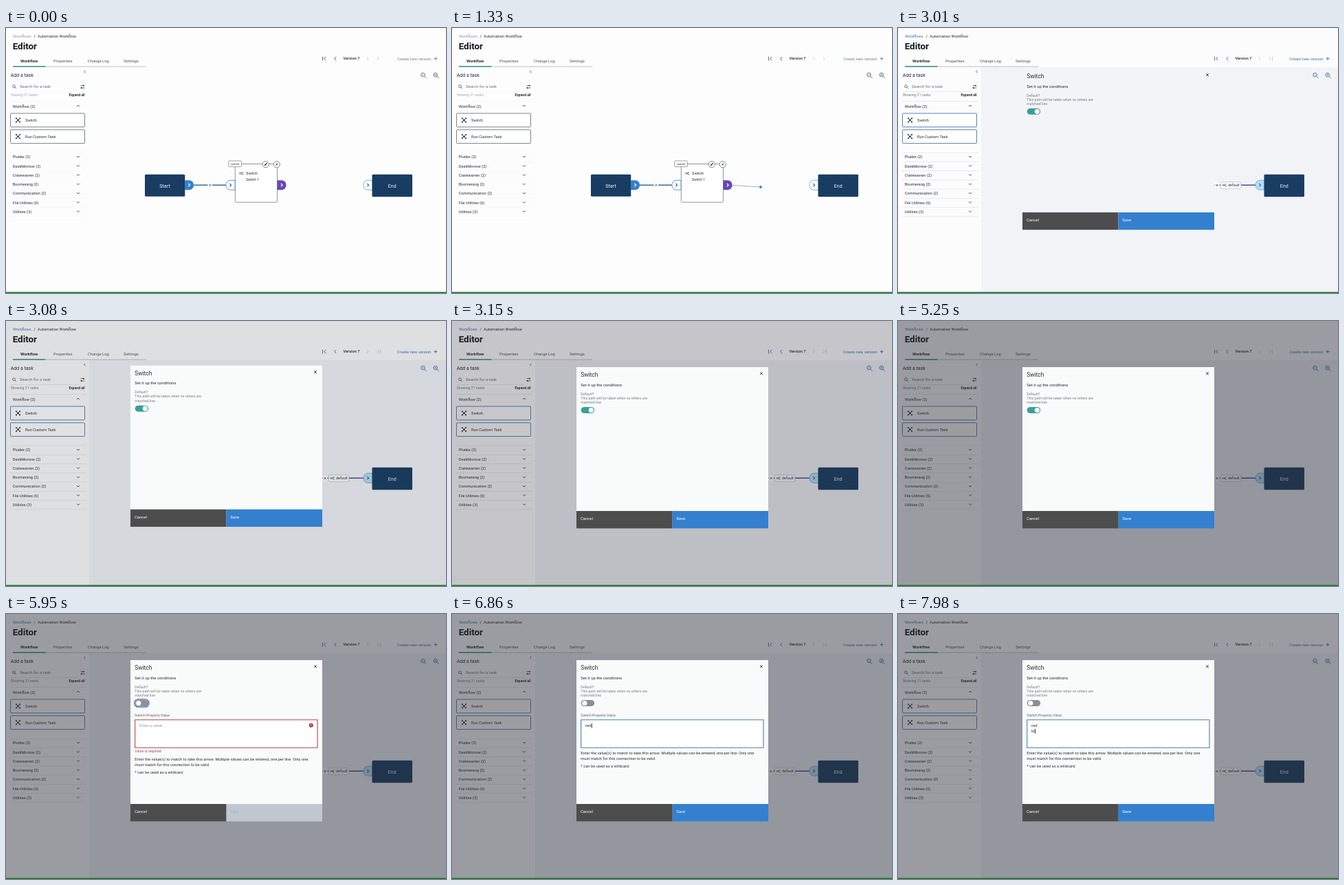
Write an HTML page with a canvas that moves like this. It is 640 px wide and 385 px high and loops after 8 s.

```html
<!DOCTYPE html>
<html lang="en">
<head>
<meta charset="utf-8">
<title>Workflow editor</title>
<style>
html, body { margin: 0; width: 100%; height: 100%; overflow: hidden; background: #fdfdfe; }
canvas { display: block; width: 640px; height: 385px; }
</style>
</head>
<body>
<canvas id="stage"></canvas>
<script>
const W = 640, H = 385, LOOP = 8000;
const canvas = document.getElementById('stage');
const scale = window.devicePixelRatio || 1;
canvas.width = W * scale;
canvas.height = H * scale;
const ctx = canvas.getContext('2d');

const TIMES = { drag: 560, drop: 2170, link: 2310, crisp: 2660, modal: 2900, dim: 3010, toggle: 5280, focus: 6160 };
const KEYS = [[6400, 'r'], [6560, 'e'], [6720, 'd'], [6960, '\n'], [7630, 'b'], [7950, 'l']];
const CATEGORIES = ['Pludex (2)', 'DeskMorrow (2)', 'Cratewarren (2)', 'Boomerang (2)',
  'Communication (2)', 'File Utilities (6)', 'Utilities (3)'];
const INK = '#272d33', NAVY = '#193c62', BLUE = '#3480cf', PURPLE = '#6848b8';

const progress = (t, start, length) => Math.min(1, Math.max(0, (t - start) / length));

function text(str, x, y, size = 5.8, color = INK, weight = 400, align = 'left') {
  ctx.font = `${weight} ${size}px Roboto, "Liberation Sans", sans-serif`;
  ctx.textAlign = align;
  ctx.textBaseline = 'middle';
  ctx.fillStyle = color;
  ctx.fillText(str, x, y);
}

function rect(x, y, w, h, color) {
  ctx.fillStyle = color;
  ctx.fillRect(x, y, w, h);
}

function box(x, y, w, h, r, fill, stroke, width = 1) {
  ctx.beginPath();
  ctx.roundRect(x, y, w, h, r);
  paint(fill, stroke, width);
}

function circle(x, y, r, fill, stroke, width = 0.7) {
  ctx.beginPath();
  ctx.arc(x, y, r, 0, Math.PI * 2);
  paint(fill, stroke, width);
}

function paint(fill, stroke, width) {
  if (fill) { ctx.fillStyle = fill; ctx.fill(); }
  if (stroke) { ctx.strokeStyle = stroke; ctx.lineWidth = width; ctx.stroke(); }
}

function line(points, color = INK, width = 0.8) {
  ctx.beginPath();
  points.forEach(([x, y]) => ctx.lineTo(x, y));
  paint(null, color, width);
}

const chevronX = (x, y, dir, size = 2, color = INK, width = 0.9) =>
  line([[x - dir * size / 2, y - size], [x + dir * size / 2, y], [x - dir * size / 2, y + size]], color, width);

const chevronY = (x, y, dir) =>
  line([[x - 2, y - dir], [x, y + dir], [x + 2, y - dir]], INK, 0.8);

function cross(x, y, r, color = INK, width = 0.8) {
  line([[x - r, y - r], [x + r, y + r]], color, width);
  line([[x - r, y + r], [x + r, y - r]], color, width);
}

function magnifier(x, y, r, color = INK, sign = '') {
  circle(x, y, r, null, color, 0.8);
  line([[x + r * 0.7, y + r * 0.7], [x + r * 1.8, y + r * 1.8]], color);
  if (sign) line([[x - 1.4, y], [x + 1.4, y]], color, 0.6);
  if (sign === '+') line([[x, y - 1.4], [x, y + 1.4]], color, 0.6);
}

function taskIcon(x, y) {
  cross(x, y, 2.8, INK, 0.7);
  for (const dx of [-2.6, 2.6])
    for (const dy of [-2.6, 2.6]) circle(x + dx, y + dy, 1, INK);
  circle(x, y, 1.3, INK);
}

function branchIcon(x, y) {
  circle(x - 2, y, 1, null, INK, 0.6);
  line([[x - 1, y], [x + 0.5, y], [x + 0.5, y - 1.5], [x + 3, y - 1.5]], INK, 0.6);
  line([[x + 0.5, y], [x + 0.5, y + 1.5], [x + 3, y + 1.5]], INK, 0.6);
}

function drawHeader(crisp) {
  const link = crisp ? '#3d74b8' : '#9299a2';
  text('Workflows', 10, 12.5, 5.7, link);
  text('/', 40.5, 12.5, 5.7);
  text('Automation Workflow', 46, 12.5, 5.8);
  text('Editor', 9.7, 27, 13.4, '#15181c', 700);

  rect(10, 55.6, 194, 0.9, '#b5bac0');
  rect(10, 55.2, 47.5, 1.4, '#328f86');
  text('Workflow', 21, 48.5, 6, INK, 700);
  text('Properties', 69, 48.5, 6, '#50565d');
  text('Change Log', 119, 48.5, 5.8, '#50565d');
  text('Settings', 171, 48.5, 6, '#50565d');

  const nav = crisp ? '#31649f' : '#41474e', off = '#c5cad0';
  line([[460.5, 41.5], [460.5, 47.5]], nav);
  chevronX(464, 44.5, -1, 2.6, nav);
  chevronX(479, 44.5, -1, 2.6, nav);
  text('Version 7', 490.5, 44.8, 5.7, INK, 500);
  chevronX(526, 44.5, 1, 2.4, off);
  chevronX(541, 44.5, 1, 2.4, off);
  if (crisp) line([[544.5, 41.5], [544.5, 47.5]], off);
  const create = crisp ? '#3874b5' : '#6f8298';
  text('Create new version', 569, 44.8, 5.85, create);
  line([[622.5, 44.5], [627.5, 44.5]], create, 0.9);
  line([[625, 42], [625, 47]], create, 0.9);
}

function drawSidebar(crisp) {
  const rule = crisp ? '#dfe3e8' : '#f6f7f9';
  const muted = crisp ? '#737a82' : '#a3a8ae';
  chevronX(114.5, 63.5, -1, 1.8, INK, 0.7);
  text('Add a task', 6.7, 68.5, 7);
  magnifier(11.5, 84.7, 1.9, '#50565d');
  text('Search for a task', 20, 85.5, 6, '#6b7178');
  rect(7, 92, 98, 0.7, rule);
  for (const [y, knob] of [[83.7, 112.7], [87, 109.7]]) {
    line([[108.5, y], [114.3, y]], INK, 0.7);
    circle(knob, y, 0.9, INK);
  }
  text(crisp ? 'Showing 21 tasks' : 'Viewing 21 tasks', 6.7, 97.5, 5.2, muted);
  text('Expand all', 91.5, 97.5, 5, INK, 700);

  rect(6, 106, 111, 0.7, rule);
  text('Workflow (2)', 9.7, 114.2, 5.8);
  chevronY(105, 113, -1);
  ['Switch', 'Run Custom Task'].forEach((name, i) => {
    const y = 124 + i * 23.8;
    box(6.5, y, 108, 19.8, 1, '#fff', crisp ? '#4776ad' : '#70767e', 0.9);
    taskIcon(17.5, y + 9.9);
    text(name, 28, y + 10.2, 5.7);
  });
  CATEGORIES.forEach((name, i) => {
    const y = 187.7 + i * 13.25;
    rect(6, y - 7, 111, 0.7, rule);
    text(name, 9.7, y, 5.7);
    chevronY(105, y - 0.7, 1);
  });
  rect(6, 273.5, 111, 0.7, rule);
}

function port(x, side, fill, stroke, arrow) {
  box(x, 221.2, 13, 14, side > 0 ? [0, 6.5, 6.5, 0] : [6.5, 0, 0, 6.5], fill, stroke, 0.9);
  chevronX(x + 6.5, 228.2, 1, 2.2, arrow, 1.2);
}

function drawFlow(t) {
  line([[273, 228.2], [320, 228.2]], '#386f9e', 1.4);
  rect(293.5, 225, 6.5, 6.5, t >= TIMES.crisp ? '#f2f4f8' : '#fdfdfe');
  cross(296.7, 228.3, 1.3, INK, 0.7);

  if (t >= TIMES.link) {
    line([[407, 228.2], [521, 228.2]], '#5549a5', 1.4);
    box(460.5, 224.5, 7, 8, 1, '#fff', null);
    cross(464, 228.5, 1.4);
    box(469.3, 223.7, 29.5, 9.6, 1, '#fff', '#b9bfd0', 0.7);
    branchIcon(475, 228.4);
    text('default', 480, 228.7, 5.4);
  } else if (t >= TIMES.drag) {
    const p = progress(t, TIMES.drag, TIMES.drop - TIMES.drag) ** 1.3;
    const x = 401 + 125 * p, y = 228 + 3.2 * Math.sin(Math.PI * p);
    line([[401, 228], [x, y]], '#9a9fa9', 0.8);
    circle(x, y, 1.9, '#338bd0');
  }

  box(202, 212.7, 58.3, 32, 1.5, NAVY);
  text('Start', 231, 229.5, 7.2, '#eef3f8', 400, 'center');
  port(260, 1, BLUE, null, '#fff');

  box(333.3, 197.5, 61.2, 55.7, 1.5, '#fff', '#858b92', 0.9);
  port(320, -1, '#fff', '#4f94ce', '#2c6ca8');
  port(394.5, 1, PURPLE, null, '#fff');
  box(323.5, 193, 19, 8.6, 1.5, '#fff', '#858b92', 0.8);
  text('switch', 333, 197.5, 4.4, INK, 400, 'center');
  circle(377.8, 198.2, 4.6, '#fff', '#666d75', 0.8);
  line([[376, 200], [379.7, 196.3]], INK, 1.3);
  circle(393.8, 198.2, 4.6, '#fff', '#666d75', 0.8);
  cross(393.8, 198.2, 1.3, INK, 0.9);
  branchIcon(342.5, 211.2);
  text('Switch', 349, 211.5, 5.7);
  text('Switch 1', 349, 220.7, 5);

  port(520, -1, t >= TIMES.drop ? '#b9dff5' : '#fff', '#6ba6d5', '#2c6ca8');
  box(532.5, 212.7, 58.5, 32.5, 1.5, NAVY);
  text('End', 561.7, 230, 7, '#eef3f8', 400, 'center');
}

function drawToggle(t) {
  const p = progress(t, TIMES.toggle, 140);
  const off = p > 0.5;
  if (off && t < TIMES.focus) box(186.7, 123.8, 21.4, 11.4, 5.7, '#fff', '#366d9f', 1.2);
  box(187.7, 125, 19.4, 9, 4.5, off ? '#8b8f94' : '#3a9f9a');
  circle(202.3 - 9.5 * p, 129.5, 3.6, '#fff');
}

function drawValueField(t) {
  const focused = t >= TIMES.focus;
  const typed = KEYS.filter(([at]) => t >= at);
  const invalid = typed.length === 0;
  text('Switch Property Value', 187.3, 147.8, 5.2, '#5f656c');
  box(187.7, 153.8, 265.3, 40.4, 0, '#fff', focused ? '#4681bd' : '#bd454e', 1.1);

  const rows = typed.map(([, key]) => key).join('').split('\n');
  rows.forEach((row, i) => text(row, 194, 162.5 + i * 8, 6));
  if (invalid) {
    text('Enter a value', 194, 162.5, 5.8, '#8f959c');
    circle(443.8, 161.7, 3, '#b92f3a');
    rect(443.4, 160, 0.8, 2.2, '#fff');
    rect(443.4, 162.8, 0.8, 0.8, '#fff');
    text('Value is required', 187.3, 199.8, 5.2, '#bd454e');
  }
  if (focused) {
    const lastKey = invalid ? TIMES.focus : typed[typed.length - 1][0];
    if ((t - lastKey) % 1060 < 530) {
      const last = rows[rows.length - 1];
      ctx.font = '400 6px Roboto, "Liberation Sans", sans-serif';
      rect(194.3 + ctx.measureText(last).width, 158.8 + (rows.length - 1) * 8, 0.8, 7, '#111');
    }
  }

  const y = invalid ? 211 : 202.2;
  text('Enter the value(s) to match to take this arrow. Multiple values can be entered, one per line. Only one', 187.3, y, 5.75);
  text('must match for this connection to be valid.', 187.3, y + 8, 5.75);
  text('* can be used as a wildcard.', 187.3, y + 19.3, 5.75);
  return invalid;
}

function drawModal(t) {
  const p = progress(t, TIMES.modal, 240);
  ctx.save();
  ctx.globalAlpha *= progress(t, TIMES.modal - 40, 100);
  ctx.translate(0, -22 * (1 - p) ** 1.6);
  rect(181, 67, 279, 210, t < TIMES.dim + 30 ? '#f2f4f8' : '#f9fafa');
  text('Switch', 187.3, 78.7, 8.4);
  cross(450, 76.3, 1.8, INK, 1);
  text('Set it up the conditions', 187.3, 93, 5.9);
  text('Default?', 187.3, 106.2, 5.2, '#777d84');
  text('This path will be taken when no others are', 187.3, 112.3, 5.2, '#777d84');
  text('matched line', 187.3, 118.4, 5.2, '#777d84');
  drawToggle(t);

  const disabled = t >= TIMES.toggle + 70 && drawValueField(t);
  rect(181, 276, 139.5, 25.3, '#4d4d4d');
  rect(320.5, 276, 139.5, 25.3, disabled ? '#c1c7d1' : BLUE);
  text('Cancel', 187, 287.7, 5.9, '#fff');
  text('Save', 326.3, 287.7, 6, disabled ? '#a3abb7' : '#fff');
  ctx.restore();
}

function draw(t) {
  const crisp = t >= TIMES.crisp;
  ctx.setTransform(scale, 0, 0, scale, 0, 0);
  rect(0, 0, W, H, '#fdfdfe');
  if (crisp) rect(121, 57, W - 121, H - 57, '#f2f4f8');
  drawHeader(crisp);
  drawSidebar(crisp);
  const tool = crisp ? '#31649f' : '#50565d';
  magnifier(606.5, 68, 2.8, tool, '-');
  magnifier(624.7, 68, 2.8, tool, '+');
  drawFlow(t);

  const dim = 1 - (1 - progress(t, TIMES.dim, 420)) ** 2;
  if (dim > 0) rect(0, 0, W, H, `rgba(40, 42, 52, ${0.46 * dim})`);
  if (t >= TIMES.modal - 40) drawModal(t);
  rect(0, 383.5, W, 1.5, '#137a1f');
}

const startTime = performance.now();
function tick() {
  draw((performance.now() - startTime) % LOOP);
  requestAnimationFrame(tick);
}
tick();
</script>
</body>
</html>
```
